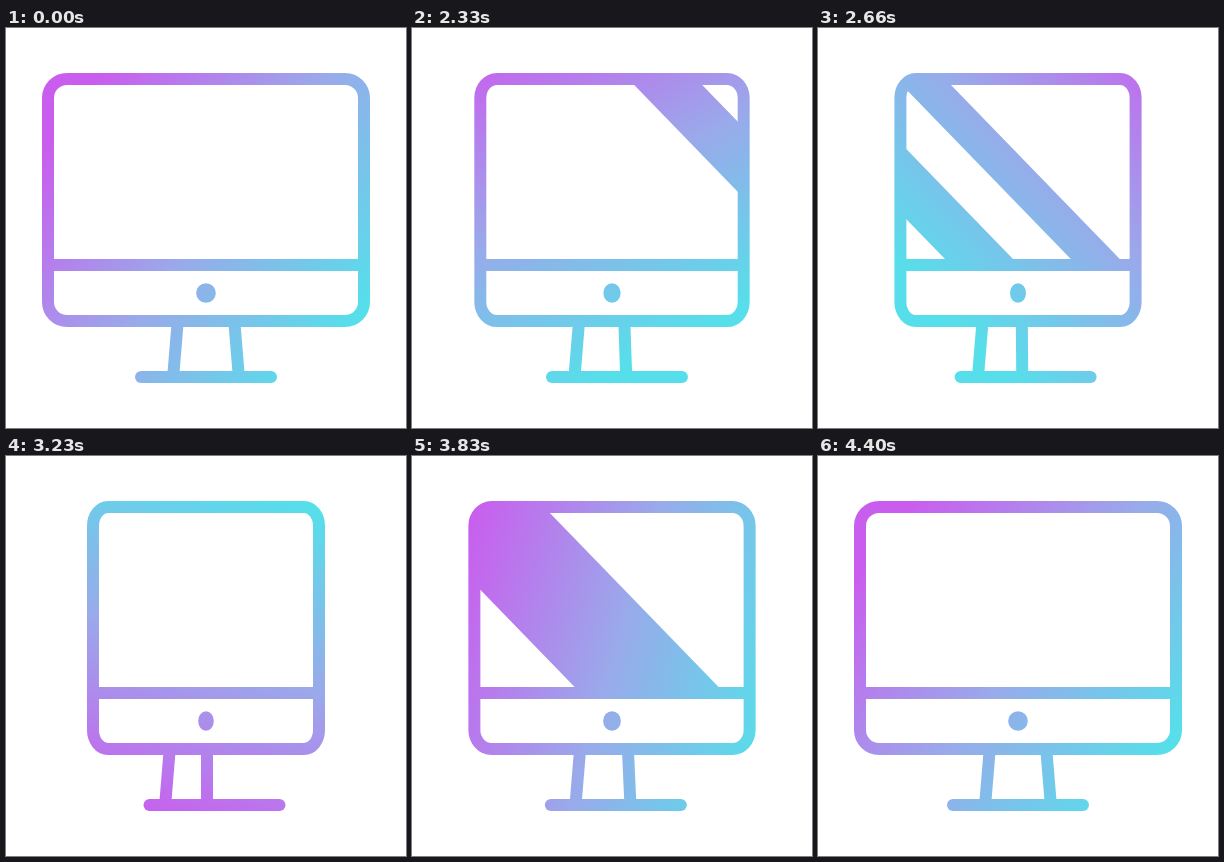
These frames come from a looping animation (400x400 px, 4430 ms). An HTML page:

```html
<!DOCTYPE html>
<html lang="en">
<head>
<meta charset="utf-8">
<title>Turning monitor</title>
<style>
html, body { margin: 0; width: 100%; height: 100%; overflow: hidden; background: #fff; }
svg { display: block; width: 100vw; height: 100vh; }
.line { fill: none; stroke: url(#paint); stroke-width: 12; }
.fill { fill: url(#paint); }
</style>
</head>
<body>
<svg viewBox="0 0 400 400">
  <defs>
    <linearGradient id="paint" gradientUnits="userSpaceOnUse">
      <stop offset="0" stop-color="#c95eee"/>
      <stop offset=".5" stop-color="#9aa9ea"/>
      <stop offset="1" stop-color="#56dfea"/>
    </linearGradient>
    <clipPath id="screen"><rect id="glass" y="51" height="186" ry="17"/></clipPath>
  </defs>
  <path id="stripes" class="fill" clip-path="url(#screen)"/>
  <path id="legs" class="line"/>
  <path id="base" class="line" stroke-linecap="round"/>
  <rect id="body" class="line" y="51" height="242" ry="19"/>
  <path id="bar" class="line"/>
  <ellipse id="dot" class="fill" cx="200" cy="265" ry="9.8"/>
</svg>
<script>
const LOOP = 4430, START = 2030, MID = 3215, END = 4400;
const $ = id => document.getElementById(id);
const set = (id, attrs) => {
  for (const k in attrs) $(id).setAttribute(k, attrs[k]);
};
const clamp = v => Math.min(1, Math.max(0, v));

function bezier(x1, y1, x2, y2) {
  const at = (a, b, s) => 3 * a * s * (1 - s) ** 2 + 3 * b * s * s * (1 - s) + s ** 3;
  return x => {
    let lo = 0, hi = 1;
    for (let i = 0; i < 24; i++) {
      const m = (lo + hi) / 2;
      if (at(x1, x2, m) < x) lo = m; else hi = m;
    }
    return at(y1, y2, (lo + hi) / 2);
  };
}
const easeBack = bezier(.58, 0, .42, 1);
const easeSpin = bezier(.33, .05, .4, 1);

// 0 = facing front, 1 = fully turned
function turn(t) {
  if (t < MID) return 1 - (1 - clamp((t - START) / (MID - START))) ** 3;
  return 1 - easeBack(clamp((t - MID) / (END - MID)));
}

// Diagonal band; x is its left edge at the top of the glass
function stripe(x, w) {
  const top = 47, bottom = 241, a = x - 10 * .97, b = x + 184 * .97;
  return `M${a} ${top}h${w}L${b + w} ${bottom}h${-w}z`;
}

function glare(t) {
  if (t < START || t > END) return '';
  if (t < MID) {
    const d = t - 2510;
    return stripe(79 - .8 * d, 68) + stripe(232 - .98 * d, 49);
  }
  return stripe(-7 + .85 * (t - 3830), 144);
}

function paint(t) {
  const u = clamp((t - START) / (END - START));
  const a = (218 + 360 * easeSpin(u)) * Math.PI / 180;
  const shift = 62 * Math.max(0, Math.sin(2 * Math.PI * u));
  const c = Math.cos(a), s = Math.sin(a), near = shift + 175, far = shift - 175;
  set('paint', { x1: 200 + c * near, y1: 200 + s * near, x2: 200 + c * far, y2: 200 + s * far });
}

function draw(now) {
  const t = now % LOOP, p = turn(t);
  const half = 158 - 45 * p, x = 200 - half, box = { x, width: 2 * half, rx: 19 - 4 * p };
  set('body', box);
  set('glass', box);
  set('bar', { d: `M${x} 237H${200 + half}` });
  set('dot', { rx: 9.8 - 2 * p });
  set('legs', {
    d: `M${171.5 - 8 * p} 296L${167.3 - 8 * p} 347M${228.5 - 27.5 * p} 296L${232.7 - 31.7 * p} 347`
  });
  set('base', { d: `M${135 + 8.5 * p} 349h130` });
  set('stripes', { d: glare(t) });
  paint(t);
}

const t0 = performance.now();
function tick() {
  draw(performance.now() - t0);
  requestAnimationFrame(tick);
}
tick();
</script>
</body>
</html>
```
